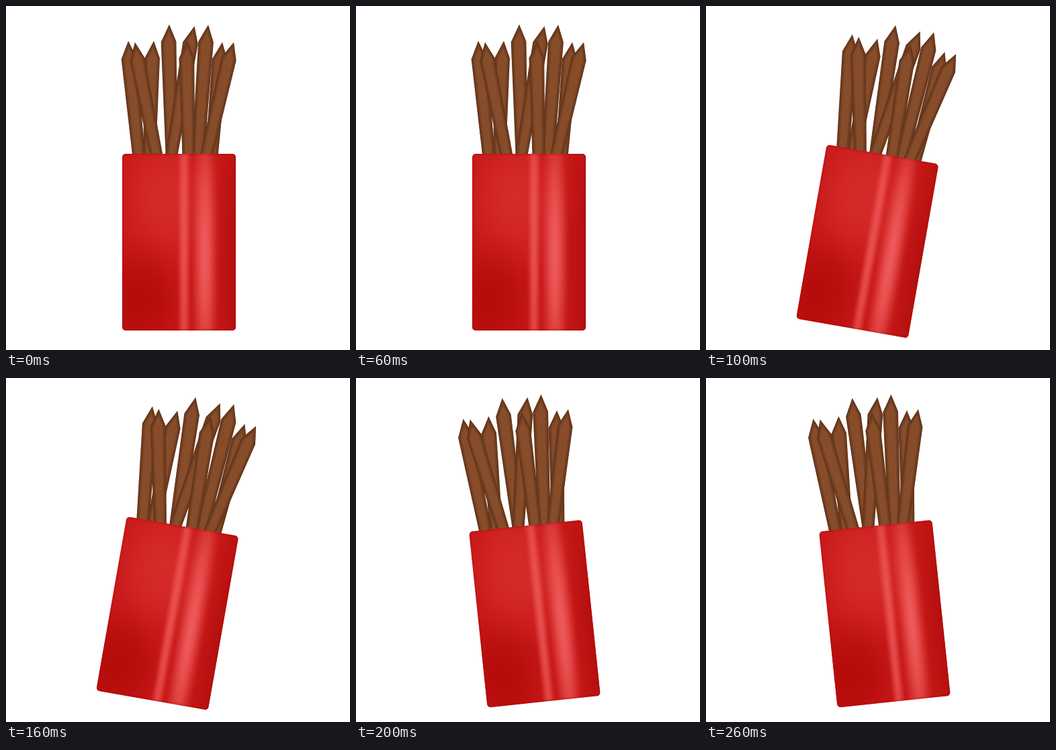
An HTML page with a canvas that plays this animation: 512 px wide and 512 px high, repeating every 300 ms.

```html
<!DOCTYPE html>
<html>
<head>
<meta charset="utf-8">
<style>
html, body { margin: 0; width: 100%; height: 100%; overflow: hidden; background: #fff; }
canvas { display: block; width: 100vw; height: 100vh; }
</style>
</head>
<body>
<canvas width="512" height="512"></canvas>
<script>
const ctx = document.querySelector('canvas').getContext('2d');
const STEP = 100;
const poses = [
  { angle: 0, dx: 0 },
  { angle: 10, dx: -0.7 },
  { angle: -6, dx: -1.5 }
];
const radians = degrees => degrees * Math.PI / 180;

// One slightly tapered stick, hanging from its tip at the origin
const stick = new Path2D('M0 0 L9.6 25.5 L7.2 205 H-10.6 L-13 26 Z');
const box = new Path2D();
box.roundRect(173, 220, 169, 263, 5);

// Darkens the inside of an outline softly towards its edge
function shadeEdge(path, color, reach) {
  ctx.save();
  ctx.clip(path);
  ctx.strokeStyle = color;
  for (let width = 2; width <= reach; width += 2) {
    ctx.lineWidth = width;
    ctx.stroke(path);
  }
  ctx.restore();
}

function drawStick(x, y, lean) {
  ctx.save();
  ctx.translate(x, y);
  ctx.rotate(radians(lean));
  ctx.fillStyle = '#874d2b';
  ctx.fill(stick);
  shadeEdge(stick, 'rgba(50,25,8,.1)', 10);
  ctx.restore();
}

// Elliptical patch of colour that falls off as a cosine bell
function glow(rgb, alpha, x, y, rx, ry) {
  const gradient = ctx.createRadialGradient(0, 0, 0, 0, 0, 1);
  for (let r = 0; r <= 1; r += 0.125) {
    const bell = (1 + Math.cos(Math.PI * r)) / 2;
    gradient.addColorStop(r, `rgba(${rgb},${alpha * bell})`);
  }
  ctx.save();
  ctx.translate(x, y);
  ctx.scale(rx, ry);
  ctx.fillStyle = gradient;
  ctx.fillRect(-1, -1, 2, 2);
  ctx.restore();
}

function drawSticks() {
  // Back to front
  drawStick(220, 52, 1.6);
  drawStick(182, 52, -5.8);
  drawStick(243, 27.5, -1.6);
  drawStick(280.5, 30, 9.6);
  drawStick(301, 28, 4);
  drawStick(270, 51.5, -1.2);
  drawStick(322, 54, 4.8);
  drawStick(192, 54, -11.3);
  drawStick(339, 54, 13);
}

function drawBox() {
  ctx.fillStyle = '#c61717';
  ctx.fill(box);
  ctx.save();
  ctx.clip(box);
  glow('216,44,44', 0.9, 238, 285, 100, 145);
  glow('178,9,9', 0.85, 197, 440, 90, 115);
  glow('176,14,14', 0.8, 345, 390, 42, 330);
  glow('240,90,90', 0.8, 265, 350, 12, 480);
  glow('240,92,92', 0.95, 296, 370, 24, 280);
  ctx.restore();
  shadeEdge(box, 'rgba(165,5,5,.1)', 6);
}

function draw() {
  const { angle, dx } = poses[Math.floor(performance.now() / STEP) % poses.length];
  ctx.clearRect(0, 0, 512, 512);
  ctx.save();
  ctx.translate(256 + dx, 256);
  ctx.rotate(radians(angle));
  ctx.translate(-256, -256);
  drawSticks();
  drawBox();
  ctx.restore();
  requestAnimationFrame(draw);
}
draw();
</script>
</body>
</html>
```
